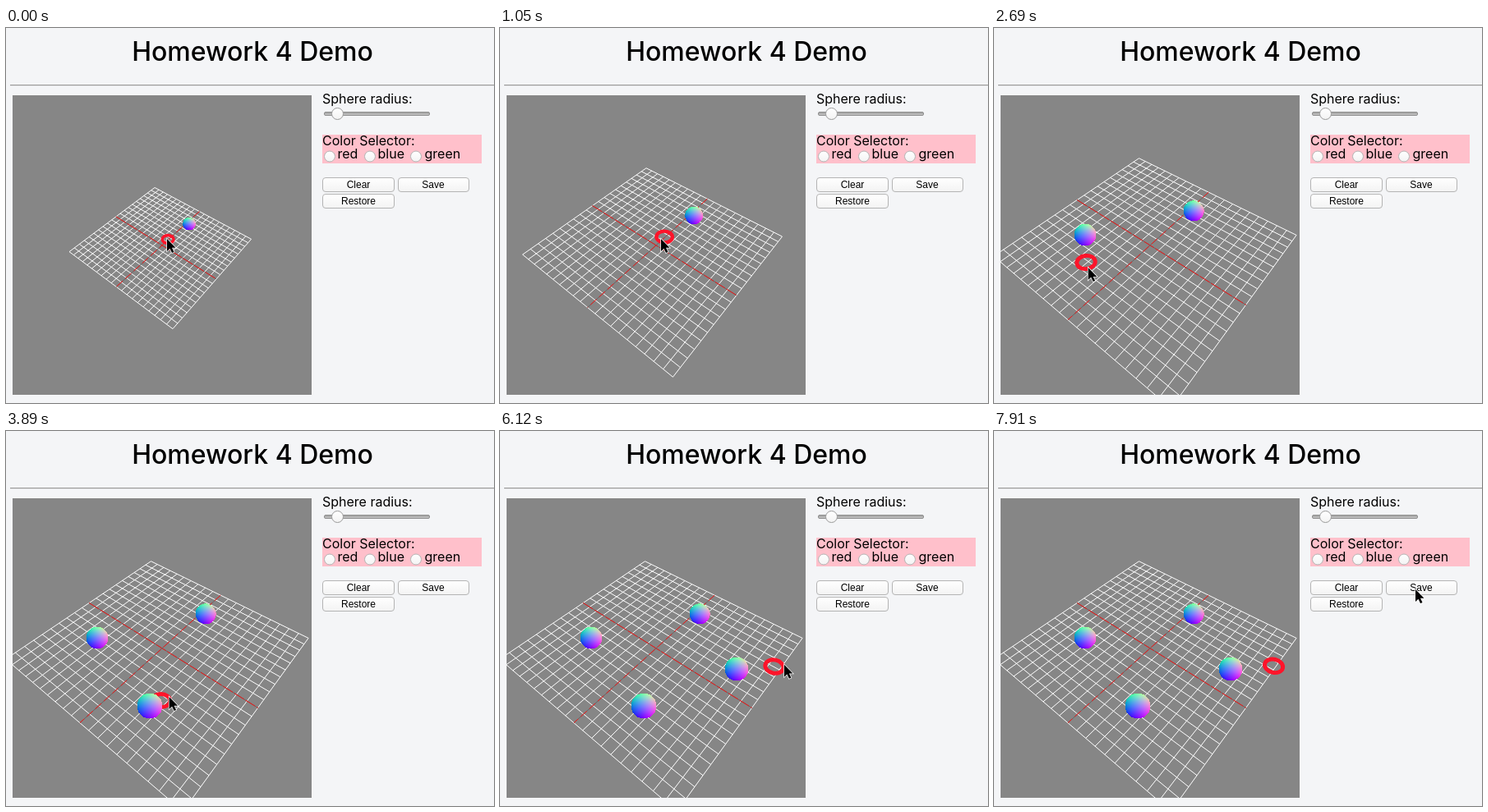
Write an HTML page with a canvas that moves like this. It is 594 px wide and 457 px high and loops after 8000 ms.

```html
<!DOCTYPE html>
<html lang="en">
<head>
<meta charset="utf-8">
<title>Homework 4 Demo</title>
<style>
  html, body { margin: 0; width: 100%; height: 100%; overflow: hidden; background: #f4f5f7; }
  svg, canvas { position: absolute; left: 0; top: 0; }
  text { font: 16px Inter, sans-serif; }
  .title { font-size: 32px; font-weight: 500; text-anchor: middle; }
  .label { font: 12px "Liberation Sans", sans-serif; text-anchor: middle; }
  .control { fill: url(#face); stroke: #b4b4b4; }
</style>
</head>
<body>
<svg width="594" height="457">
  <defs>
    <linearGradient id="face" x2="0" y2="1">
      <stop stop-color="#fff"/><stop offset="1" stop-color="#f3f3f3"/>
    </linearGradient>
    <linearGradient id="track" x2="0" y2="1">
      <stop stop-color="#999"/><stop offset="1" stop-color="#ccc"/>
    </linearGradient>
  </defs>
  <text class="title" x="300" y="40">Homework 4 Demo</text>
  <path d="M5 69.5H594" stroke="#999"/>
  <path d="M5 70.5H594" stroke="#e2e2e4"/>

  <text x="385" y="92">Sphere radius:</text>
  <rect x="387.5" y="102.5" width="128" height="4" rx="1.5" fill="url(#track)" stroke="#919191"/>
  <circle class="control" cx="403.5" cy="104.5" r="7" style="stroke:#999"/>

  <rect x="385" y="130" width="194" height="35" fill="#ffc0cb"/>
  <text x="385" y="143">Color Selector:</text>
  <g class="control">
    <circle cx="394" cy="156.5" r="6.5"/>
    <circle cx="443" cy="156.5" r="6.5"/>
    <circle cx="499" cy="156.5" r="6.5"/>
  </g>
  <text x="403.5" y="159">red</text>
  <text x="452.5" y="159">blue</text>
  <text x="509.5" y="159">green</text>

  <g class="control">
    <rect x="385.5" y="182.5" width="87" height="17" rx="3.5"/>
    <rect x="477.5" y="182.5" width="86" height="17" rx="3.5"/>
    <rect x="385.5" y="202.5" width="87" height="17" rx="3.5"/>
  </g>
  <text class="label" x="429" y="195">Clear</text>
  <text class="label" x="520" y="195">Save</text>
  <text class="label" x="429" y="215">Restore</text>
</svg>
<canvas id="stage" width="594" height="457"></canvas>
<script>
const ctx = document.getElementById('stage').getContext('2d');
const LOOP = 8000, STEP = 149.25;
const CENTER = { x: 190, y: 264.8 };

// Half diagonals of the grid in view space: x, y, depth
const NEAR = [10.6, 83.2, -0.183], RIGHT = [110.7, -7.7, 0.02];

// Pointer moves between steps, bent sideways into an arc; a click leaves a sphere
const START = { x: 195, y: 258 };
const MOVES = [
  { from: 9, to: 15, x: 111, y: 251, bend: 0, click: 16 },
  { from: 16, to: 22, x: 175, y: 334, bend: 0.26, click: 24 },
  { from: 25, to: 30, x: 288, y: 289, bend: 0, click: 34 },
  { from: 39, to: 47, x: 470, y: 191, bend: 0.165 },
  { from: 47, to: 50, x: 537, y: 196, bend: 0 },
  { from: 50, to: 53, x: 512, y: 194, bend: 0 }
];
const ZOOM_END = 9, RING_LAG = 0.4, LEAVES_GRID = 40.84;

function pointerAt(step) {
  let at = START;
  for (const move of MOVES) {
    if (step <= move.from) break;
    const k = Math.min(1, (step - move.from) / (move.to - move.from));
    const dx = move.x - at.x, dy = move.y - at.y;
    const side = move.bend * Math.sin(Math.PI * k);
    at = { x: at.x + dx * k - dy * side, y: at.y + dy * k + dx * side };
  }
  return at;
}

function project([x, y, z], zoom) {
  const scale = zoom / (1 + z * zoom);
  return { x: CENTER.x + x * scale, y: CENTER.y + y * scale, scale };
}

const gridPoint = (u, v, zoom) =>
  project(NEAR.map((n, i) => (n * (u + v) + RIGHT[i] * (u - v)) / 2), zoom);

function gridLine(u0, v0, u1, v1, zoom) {
  const a = gridPoint(u0, v0, zoom), b = gridPoint(u1, v1, zoom);
  ctx.moveTo(a.x, a.y);
  ctx.lineTo(b.x, b.y);
}

function drawAxis(ends, dash, zoom) {
  ctx.beginPath();
  gridLine(...ends, zoom);
  ctx.strokeStyle = '#666';
  ctx.stroke();
  ctx.setLineDash(dash);
  ctx.strokeStyle = '#f51414';
  ctx.stroke();
  ctx.setLineDash([]);
}

function drawGrid(zoom) {
  ctx.lineWidth = 1;
  ctx.strokeStyle = '#fff';
  ctx.beginPath();
  for (let i = -10; i <= 10; i++) {
    if (i === 0) continue;
    gridLine(i / 10, -1, i / 10, 1, zoom);
    gridLine(-1, i / 10, 1, i / 10, zoom);
  }
  ctx.stroke();
  drawAxis([-1, 0, 1, 0], [14, 2], zoom);
  drawAxis([0, -1, 0, 1], [10, 4], zoom);
}

// Each pixel is coloured by the surface normal
function drawSphere(cx, cy, r) {
  for (let y = Math.floor(cy - r); y <= cy + r; y++) {
    for (let x = Math.floor(cx - r); x <= cx + r; x++) {
      const nx = (x + 0.5 - cx) / r, ny = (cy - y - 0.5) / r;
      const d = nx * nx + ny * ny;
      if (d > 1) continue;
      const nz = Math.sqrt(1 - d);
      ctx.fillStyle = `rgb(${128 + 127 * nx},${130 + 135 * ny},${190 + 60 * nz - 45 * ny})`;
      ctx.fillRect(x, y, 1, 1);
    }
  }
}

function drawRing({ x, y }, scale) {
  ctx.strokeStyle = '#ff142a';
  ctx.lineWidth = 1.4 + 2.2 * scale;
  ctx.beginPath();
  ctx.ellipse(x, y, 7 * scale, 5 * scale, (x - CENTER.x) * 0.0016, 0, 2 * Math.PI);
  ctx.stroke();
}

const arrow = new Path2D('M0 0V15L3.5 11.7L6 17L8.5 16L6 10.8H10.5Z');

function drawPointer({ x, y }) {
  ctx.save();
  ctx.translate(x + 1, y - 1);
  ctx.lineWidth = 1.4;
  ctx.strokeStyle = '#fff';
  ctx.stroke(arrow);
  ctx.fillStyle = '#000';
  ctx.fill(arrow);
  ctx.restore();
}

function draw(time) {
  const step = Math.floor(time / STEP);
  const wheel = Math.min(12, Math.round(1.55 * Math.max(0, step - 1)));
  const zoom = 1 / (1 - 0.0332 * wheel);

  ctx.clearRect(0, 0, 594, 457);
  ctx.save();
  ctx.beginPath();
  ctx.rect(8, 82, 364, 365);
  ctx.clip();
  ctx.fillStyle = '#868686';
  ctx.fillRect(8, 82, 364, 365);
  drawGrid(zoom);

  const rest = project([7.3, -7.4, 0.02], zoom);
  const trail = pointerAt(Math.min(step - RING_LAG, LEAVES_GRID));
  drawRing(step > ZOOM_END ? trail : rest, rest.scale);

  const first = project([34.8, -27.5, 0.0536], zoom);
  drawSphere(first.x, first.y, 8.2 * first.scale);
  for (const { x, y, click } of MOVES) {
    if (step >= click) drawSphere(x, y + 1, 6.8 + 0.026 * y);
  }
  ctx.restore();

  drawPointer(pointerAt(step));
}

function tick() {
  draw(performance.now() % LOOP);
  requestAnimationFrame(tick);
}
tick();
</script>
</body>
</html>
```
